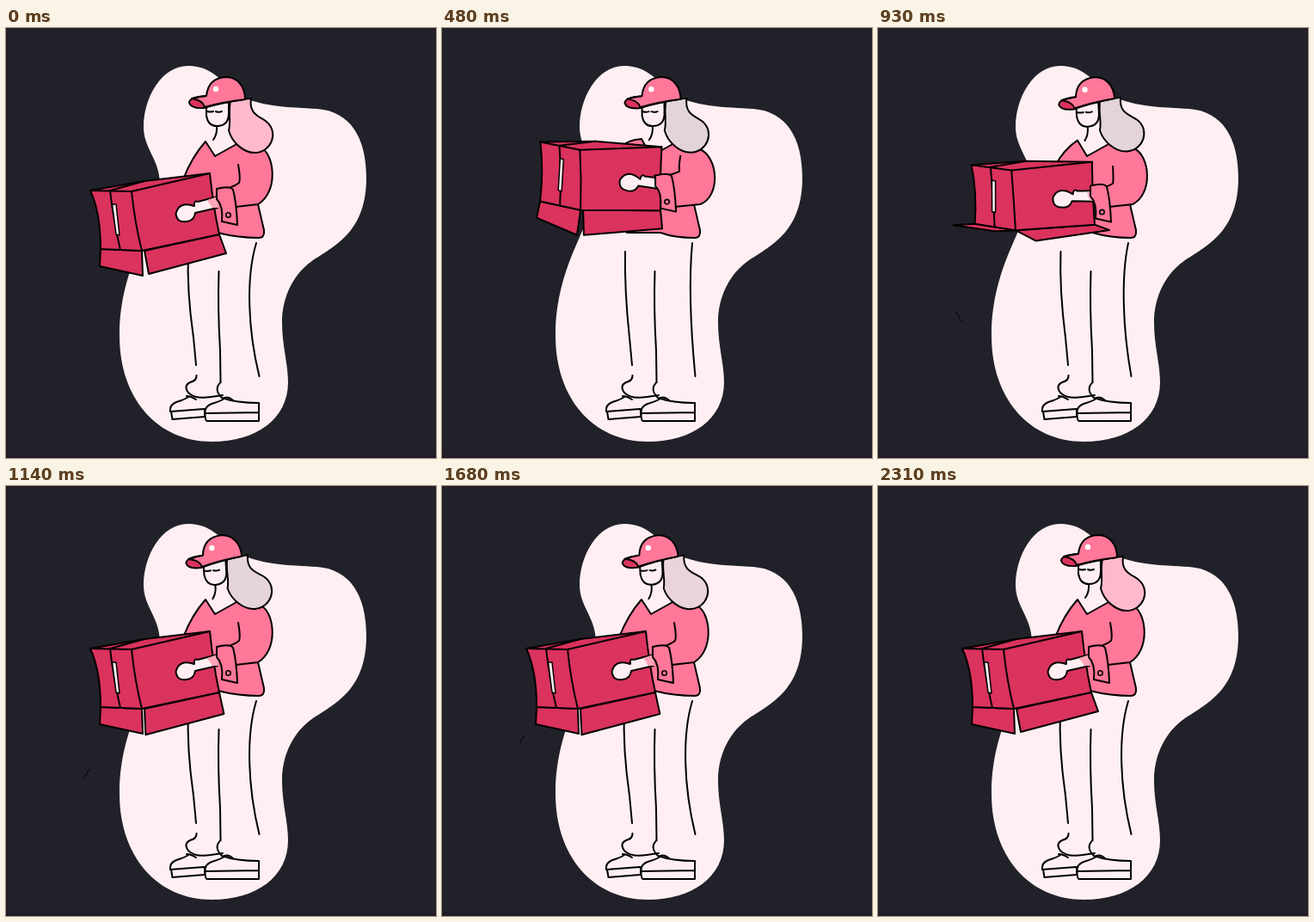
Animation of 500x500 px, one loop 2.34 s. Source, as an HTML page with a canvas:

```html
<!DOCTYPE html>
<html lang="en">
<head>
<meta charset="utf-8">
<title>Parcel carrier</title>
<style>
  html, body { margin: 0; width: 100%; height: 100%; overflow: hidden; background: #202129; }
  canvas { display: block; }
</style>
</head>
<body>
<canvas id="stage" width="500" height="500"></canvas>
<script>
const ctx = document.getElementById('stage').getContext('2d');
const LOOP = 2340, STEP = 30;
const INK = '#000', BLUSH = '#ffeff2', SHIRT = '#ff7799', BOX = '#da335d';

// Smooth step from 0 to 1 between two times.
function ramp(t, from, to) {
  const u = Math.min(1, Math.max(0, (t - from) / (to - from)));
  return u * u * (3 - 2 * u);
}

// Soft pulse around a time, wrapping over the loop.
function pulse(t, center, width) {
  const gap = Math.abs(t - center), d = Math.min(gap, LOOP - gap) / width;
  return Math.exp(-d * d);
}

function poseAt(t) {
  const hoist = ramp(t, 0, 400), sink = ramp(t, 400, 720), shake = ramp(t, 720, 930), fall = ramp(t, 930, 1080);
  const raise = 1.12 * hoist - .6 * sink + .14 * shake - .66 * fall;
  const drop = -6 * ramp(t, 480, 720) + 12.5 * shake - 6.5 * fall;
  return {
    raise, drop,
    reach: raise - drop / 30,
    open: shake - 1.2 * ramp(t, 930, 1140) + .2 * ramp(t, 2190, 2310),
    tilt: -.075 * (ramp(t, 240, 1350) - ramp(t, 1440, 2310))
  };
}

function hairColor(t) {
  const rosy = pulse(t, 0, 200), pale = pulse(t, 1440, 200);
  const red = 226 + 29 * (rosy + pale), green = 212 - 27 * rosy, blue = 217 - 13 * rosy + 5 * pale;
  return `rgb(${[red, green, blue].map(Math.round)})`;
}

function draw(path, fill, stroke = INK, width = 2) {
  const p = new Path2D(path);
  if (fill) { ctx.fillStyle = fill; ctx.fill(p); }
  if (stroke) { ctx.strokeStyle = stroke; ctx.lineWidth = width; ctx.stroke(p); }
}

function circle(x, y, r, fill, stroke) {
  ctx.beginPath();
  ctx.arc(x, y, r, 0, 2 * Math.PI);
  if (fill) { ctx.fillStyle = fill; ctx.fill(); }
  if (stroke) { ctx.strokeStyle = stroke; ctx.lineWidth = 1.6; ctx.stroke(); }
}

// Runs a drawing shifted by dx, dy and turned about a pivot.
function moved(dx, dy, angle, px, py, paint) {
  ctx.save();
  ctx.translate(px + dx, py + dy);
  ctx.rotate(angle);
  ctx.translate(-px, -py);
  paint();
  ctx.restore();
}

function backdrop() {
  ctx.fillStyle = '#202129';
  ctx.fillRect(0, 0, 500, 500);
  ctx.fillStyle = '#1e1d29';
  ctx.fillRect(0, 496, 500, 4);
  draw('M212 44C180 44 160 82 160 115C160 140 178 152 179 180C180 225 132 270 132 358C132 430 175 481 240 481'
    + 'C290 481 328 455 328 412C328 390 321 370 321 342C321 312 335 285 357 270C385 252 419 235 419 174'
    + 'C419 127 400 97 362 94C330 92 292 92 268 76C252 64 240 44 212 44Z', BLUSH, null);
}

function legs(reach) {
  const knee = 279 + 8 * reach;
  draw(`M${212 + reach} 260Q${210 + 2 * reach} 305 218 360L221 392`);
  draw('M247.5 283Q246 325 249 375L249.5 412');
  draw(`M291 250C${knee} 290 ${knee + 2} 350 294.5 405`);
  // shoes
  draw('M212 429Q208 432 198 435Q190 438 191 446L230 443M192 446L193.5 455L231 452L231 443');
  draw('M255 430Q250 434 239 437Q231 440 231.5 448L294 447M294 436L294 457L234 457Q231.5 457 231.5 448');
  // trouser hems and laces
  draw('M221.5 404Q222 410 214 412Q206 416 212 424Q220 432 238 429L252 427');
  draw('M249.5 412Q241 420 251 430Q268 436 294 436');
  draw('M210 428Q215 428 221 432M254 430Q259 428 264 433');
}

function torso(reach) {
  draw('M246 110L245 122L232 132L243 149L272 133L262 100Z', BLUSH, null);
  const collar = 132 - 3 * reach;
  draw(`M232 ${collar}L243 149L270 134L298 140L293 205L300 235Q301 244 294 244Q270 244 ${246 + 8 * reach} 238`
    + `L215 238L206 ${176 - 35 * reach}Q216 ${150 - 20 * reach} 232 ${collar}Z`, SHIRT);
}

function carton(raise, open) {
  const at = (x, y, upX, upY) => [x + (upX - x) * raise, y + (upY - y) * raise];
  const shift = ([x, y], dx, dy, k) => [x + dx * k, y + dy * k];
  const poly = (...points) => `M${points.join('L')}Z`;
  const line = (...points) => `M${points.join('L')}`;

  const left = at(98, 189, 114, 134), back = at(161, 178, 178, 133), right = at(237, 169, 255, 139);
  const near = at(146, 190, 160, 143), nearLow = at(158, 259, 161, 213);
  const rightLow = at(248, 240, 254, 213), leftLow = at(110, 257, 114, 203);
  const seam = at(121, 189, 136, 138), seamLow = at(133, 258, 137, 207);

  const swing = Math.max(0, open), tuck = Math.max(-.2, open);
  draw(poly(leftLow, nearLow,
    shift(at(159, 288, 157, 242), -22, -28, swing), shift(at(109, 277, 110, 222), -22, -18, swing)), BOX);
  draw(poly(shift(nearLow, 3, 0, 1 - swing), rightLow,
    shift(at(256, 262, 256, 234), 13, -15, tuck), shift(at(166, 286, 165, 242), 18, -16, tuck)), BOX);

  draw(`M${left}L${back}L${right}Q${at(241, 208, 253, 175)} ${rightLow}L${nearLow}L${leftLow}`
    + `Q${at(110, 215, 118, 168)} ${left}Z`, BOX);
  draw(line(left, near, right) + line(seam, back));
  draw(`M${near}Q${at(150, 228, 162, 178)} ${nearLow}M${seam}Q${at(125, 225, 139, 172)} ${seamLow}`);
  draw(poly(at(123.5, 205, 137, 153), at(128, 205, 141, 154),
    at(132, 241, 139, 191), at(128, 240, 135, 190)), BLUSH, INK, 1.5);
}

function hand() {
  draw('M246 196L223 202Q218 200 219 207Q201 201 197.5 216Q199 227 210 225Q219 224 220 215L246 209', BLUSH);
  draw('M234 200L246 196L247 209L240 209Z', '#ffa5ba', null);
}

function cuff() {
  draw('M245 187Q260 183 264 188Q268 203 269 229L251 225Q253 207 245 199Z', SHIRT);
  circle(258.5, 217.5, 2.7, null, INK);
}

function sleeve({ raise, reach, drop }) {
  const arm = `M298 140C${312 + 10 * reach} 149 ${317 + 7 * reach} ${190 + 6 * reach} ${293 + 7 * reach} 205`
    + `L${267 + 3 * reach} 208`;
  const elbow = 180 - 13 * reach;
  draw(`${arm}L${251 + 2 * reach} ${191 - 16 * reach}L272 ${elbow}L270 140Z`, SHIRT, null);
  draw(arm);
  moved(0, drop, 0, 0, 0, () => draw(`M${270 + 7 * reach} ${159 - 10 * reach}Q${273 + 2 * reach} ${elbow - 5} `
    + `${271 + 5 * reach} ${elbow}Q262 ${elbow + 7} 247 ${elbow + 8 - 3 * reach}`));
  moved(3 * raise, drop - 15 * raise, 0, 0, 0, cuff);
}

function head(tone) {
  draw('M245 113Q246 123 241 130', BLUSH);
  draw('M233 89L233 102Q235 114 245 114Q259 114 259 99L259 86Z', BLUSH);
  draw('M234.5 97Q237 98 241 97M244 97Q247 98.5 251 97');
  draw('M261 84L285 82C282 101 296 103 303 109C318 122 308 145 289 145C277 145 263 134 259 119'
    + 'C262 108 258 100 261 84Z', tone);
  draw('M233 79Q213 80 213 87Q215 94 230 93Q250 87 277 83L262 76Z', BOX);
  draw('M233 79Q225 80 216 82Q229 84 231 92Q252 86 278 83C278 68 269 57 256 57Q235 58 233 79Z', SHIRT);
  circle(244, 71, 3.2, '#fff');
}

// Bits of straw flash up below the carton while it is tipped.
function straws(t) {
  let seed = 7;
  const random = () => (seed = seed * 16807 % 2147483647) / 2147483647;
  for (let born = 720; born < 2100; born += 240) {
    const x = 82 + 16 * random(), y = 290 + 90 * random(), angle = Math.PI * random(), size = 3 + 4 * random();
    const dx = size * Math.cos(angle), dy = size * Math.sin(angle), age = t - born;
    const fall = y + .08 * age;
    if (Math.abs(age) <= 60) draw(`M${x - dx} ${fall - dy}L${x + dx} ${fall + dy}`, null, INK, 1);
  }
}

function render(t) {
  const pose = poseAt(t), { raise, reach, drop } = pose;
  backdrop();
  legs(reach);
  torso(reach);
  moved(0, drop, 0, 0, 0, () => carton(raise, pose.open));
  moved(9 * raise, drop - 35 * raise, .37 * raise, 208, 215, hand);
  sleeve(pose);
  moved(0, 0, pose.tilt, 258, 140, () => head(hairColor(t)));
  straws(t);
}

ctx.lineJoin = ctx.lineCap = 'round';
const start = performance.now();
function tick() {
  const t = (performance.now() - start) % LOOP;
  render(Math.floor(t / STEP) * STEP);
  requestAnimationFrame(tick);
}
tick();
</script>
</body>
</html>
```
